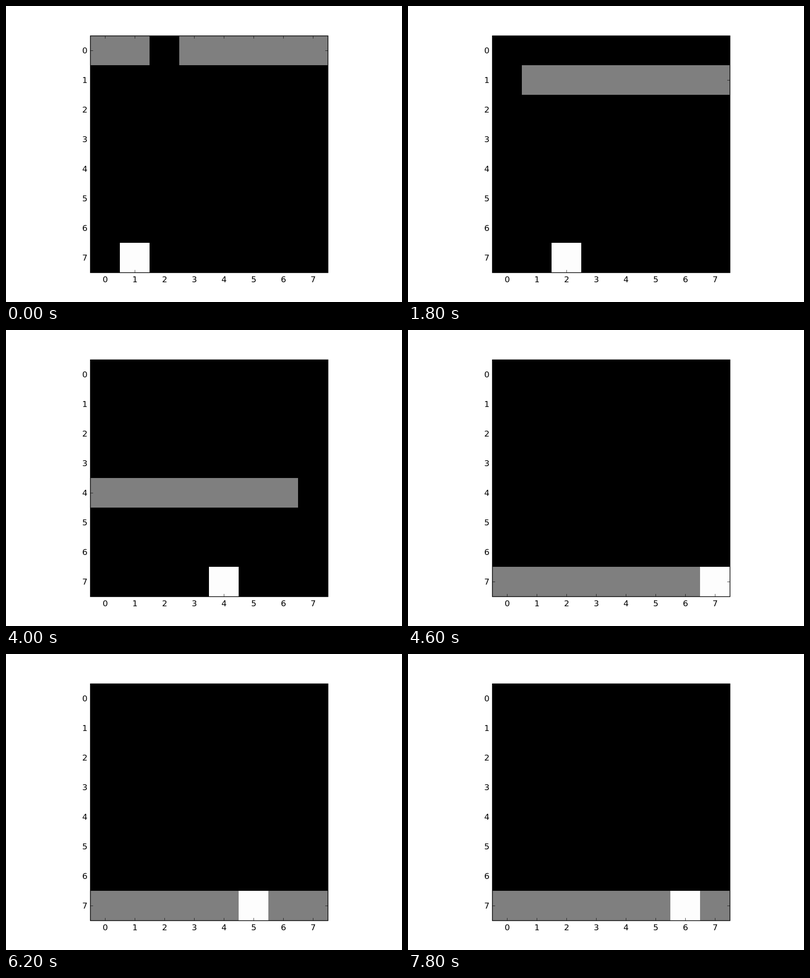
These frames come from a looping animation (800x600 px, 8000 ms). An HTML page with a canvas:

```html
<!DOCTYPE html>
<html lang="en">
<head>
<meta charset="utf-8">
<title>Falling wall</title>
<style>
  html, body { margin: 0; width: 100%; height: 100%; overflow: hidden; background: #fff; }
  canvas { display: block; }
</style>
</head>
<body>
<canvas id="stage" width="800" height="600"></canvas>
<script>
const ctx = document.getElementById('stage').getContext('2d');
const SIZE = 8, CELL = 60, LEFT = 170, TOP = 60, SPAN = SIZE * CELL;
const STEP_MS = 200, LOOP_MS = 8000, TICK = 5.5;
const GAPS = [2, 0, 7, 5, 6];
const FIRST_COLUMN = 1;

function fillCell(column, row, color) {
  ctx.fillStyle = color;
  ctx.fillRect(LEFT + column * CELL, TOP + row * CELL, CELL, CELL);
}

function line(x, y, dx, dy) {
  ctx.beginPath();
  ctx.moveTo(x, y);
  ctx.lineTo(x + dx, y + dy);
  ctx.stroke();
}

// The player waits, then leaves just in time to reach the gap on the last row.
function playerColumn(round, row) {
  const start = round ? GAPS[round - 1] : FIRST_COLUMN;
  const offset = start - GAPS[round];
  return GAPS[round] + Math.sign(offset) * Math.min(Math.abs(offset), SIZE - 1 - row);
}

function drawAxes() {
  const x0 = LEFT + 0.5, y0 = TOP + 0.5;
  ctx.strokeStyle = ctx.fillStyle = '#000';
  ctx.lineWidth = 1.39;
  ctx.strokeRect(x0, y0, SPAN, SPAN);

  ctx.lineWidth = 0.69;
  ctx.font = '16.67px "DejaVu Sans", sans-serif';
  for (let i = 0; i < SIZE; i++) {
    const mid = (i + 0.5) * CELL;
    line(x0 + mid, y0, 0, TICK);
    line(x0 + mid, y0 + SPAN, 0, -TICK);
    line(x0, y0 + mid, TICK, 0);
    line(x0 + SPAN, y0 + mid, -TICK, 0);
    ctx.textAlign = 'center';
    ctx.fillText(i, x0 + mid, 560);
    ctx.textAlign = 'right';
    ctx.fillText(i, 164.6, TOP + mid + 6);
  }
}

function draw(time) {
  const step = Math.floor((time % LOOP_MS) / STEP_MS);
  const round = Math.floor(step / SIZE), row = step % SIZE;

  ctx.fillStyle = '#fff';
  ctx.fillRect(0, 0, 800, 600);
  ctx.fillStyle = '#000';
  ctx.fillRect(LEFT, TOP, SPAN, SPAN);

  for (let column = 0; column < SIZE; column++) {
    if (column !== GAPS[round]) fillCell(column, row, '#7f7f7f');
  }
  fillCell(playerColumn(round, row), SIZE - 1, '#fdfdfd');
  drawAxes();
}

const startTime = performance.now();
function tick() {
  draw(performance.now() - startTime);
  requestAnimationFrame(tick);
}
tick();
</script>
</body>
</html>
```
